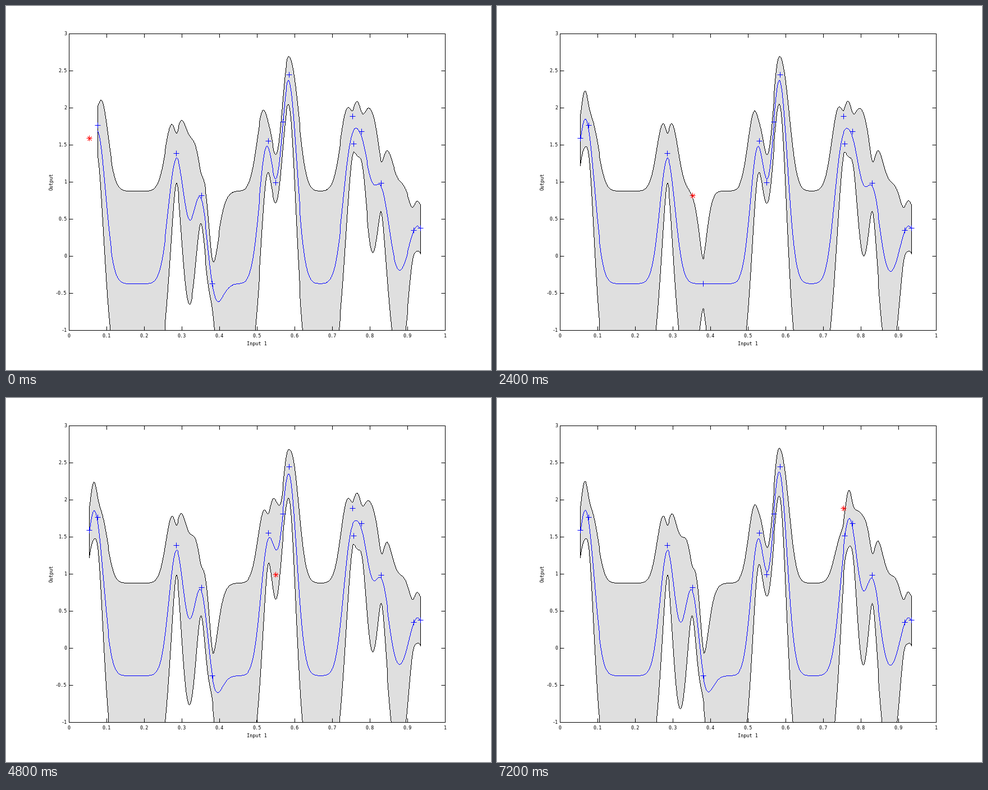
Recreate the animation shown at these times as a matplotlib script. Size 864x648 px, loop 8 s.

```python
import numpy as np
import matplotlib
import matplotlib.pyplot as plt
from matplotlib.animation import FuncAnimation
from matplotlib.transforms import IdentityTransform

matplotlib.rcParams["font.family"] = "DejaVu Sans Mono"

W, H, DPI = 864, 648, 100
PX = 72 / DPI  # one pixel in points
BOX = (0.13, 0.11, 0.775, 0.815)
FRAMES = 10

# Observations, left to right
POINTS = np.array([
    (.0541, 1.590), (.0757, 1.765), (.2856, 1.385), (.3520, .816),
    (.3804, -.373), (.5305, 1.548), (.5500, .990), (.5686, 1.810),
    (.5857, 2.447), (.7538, 1.886), (.7575, 1.510), (.7784, 1.680),
    (.8307, .984), (.9165, .348), (.9345, .379)])

SIGNAL, NOISE = .189, .0072  # variances of the scaled output


def kernel(a, b, width):
    return SIGNAL * np.exp(-(a[:, None] - b) ** 2 / (2 * width ** 2))


def predict(x, y, width):
    """Gaussian process mean and band half-height between the end points."""
    low, span = y.min(), np.ptp(y)
    grid = np.linspace(x.min(), x.max(), 600)
    gram = kernel(x, x, width) + NOISE * np.eye(len(x))
    cross = kernel(grid, x, width)
    gain = np.linalg.solve(gram, cross.T).T
    mean = low + gain @ (y - low)
    var = SIGNAL + NOISE - np.sum(gain * cross, axis=1)
    return grid, mean, span * np.sqrt(var)


fig = plt.figure(figsize=(W / DPI, H / DPI), dpi=DPI, facecolor="white")
ax = fig.add_axes(BOX)
ax.set(xlim=(0, 1), ylim=(-1, 3),
       xticks=np.arange(11) / 10, yticks=np.arange(-2, 7) / 2)
ax.tick_params(direction="in", top=True, right=True, length=6.7 * PX,
               width=PX, labelbottom=False, labelleft=False)
for spine in ax.spines.values():
    spine.set_linewidth(PX)


def label(x, y, text, ha="center", **kw):
    fig.text(x / W, 1 - y / H, text, ha=ha, va="baseline", fontsize=6.1, **kw)


left, top = BOX[0] * W, (1 - BOX[1] - BOX[3]) * H
for t in ax.get_xticks():
    label(left + t * BOX[2] * W, 590.5, f"{t:g}")
for t in ax.get_yticks():
    label(108.5, top + (3 - t) / 4 * BOX[3] * H + 3.3, f"{t:g}", ha="right")
label(447, 604.5, "Input 1")
label(83.5, 313, "Output", rotation=90, rotation_mode="anchor")


def pixels(points):
    """Whole-pixel positions of data points."""
    return np.floor(ax.transData.transform(points) - (0, .5))


def trace(points):
    """Every pixel on the hard-edged line through the points."""
    corners = pixels(points)
    steps = np.abs(np.diff(corners, axis=0)).max(axis=1)
    at = np.append(0, steps.cumsum())
    walk = np.arange(at[-1] + 1)
    return [np.round(np.interp(walk, at, axis)) for axis in corners.T]


def pixel_art(marker, color, zorder, size=1):
    line, = ax.plot([], [], linestyle="", marker=marker, color=color,
                    markersize=size * PX, markeredgewidth=PX, zorder=zorder,
                    transform=IdentityTransform())
    return line


band, = ax.fill([0, 0, 1], [0, 0, 0], facecolor="#dfdfdf", linewidth=0,
                zorder=1)
outline = pixel_art(",", "black", 2)
curve = pixel_art(",", "blue", 2.1)
for line in (outline, curve):
    line.set_antialiased(False)
kept = pixel_art("+", "blue", 3, 10)
star = [pixel_art("+", "red", 3, 10), pixel_art("x", "red", 3, 7)]


def draw(i):
    rest = np.delete(POINTS, i, axis=0)
    grid, mean, half = predict(*rest.T, .0211 - .00014 * i)
    upper = np.column_stack([grid, mean + half])
    lower = np.column_stack([grid, mean - half])
    ring = np.vstack([upper, lower[::-1], upper[:1]])
    band.set_xy(ring)
    outline.set_data(*trace(ring))
    curve.set_data(*trace(np.column_stack([grid, mean])))

    spots = pixels(POINTS) + (0, 1)
    kept.set_data(*np.delete(spots, i, axis=0).T)
    for part in star:
        part.set_data(*spots[i:i + 1].T)
    return [band, outline, curve, kept, *star]


anim = FuncAnimation(fig, draw, frames=FRAMES, interval=800,
                     init_func=lambda: draw(0), repeat=True, blit=False)
plt.show()
```
